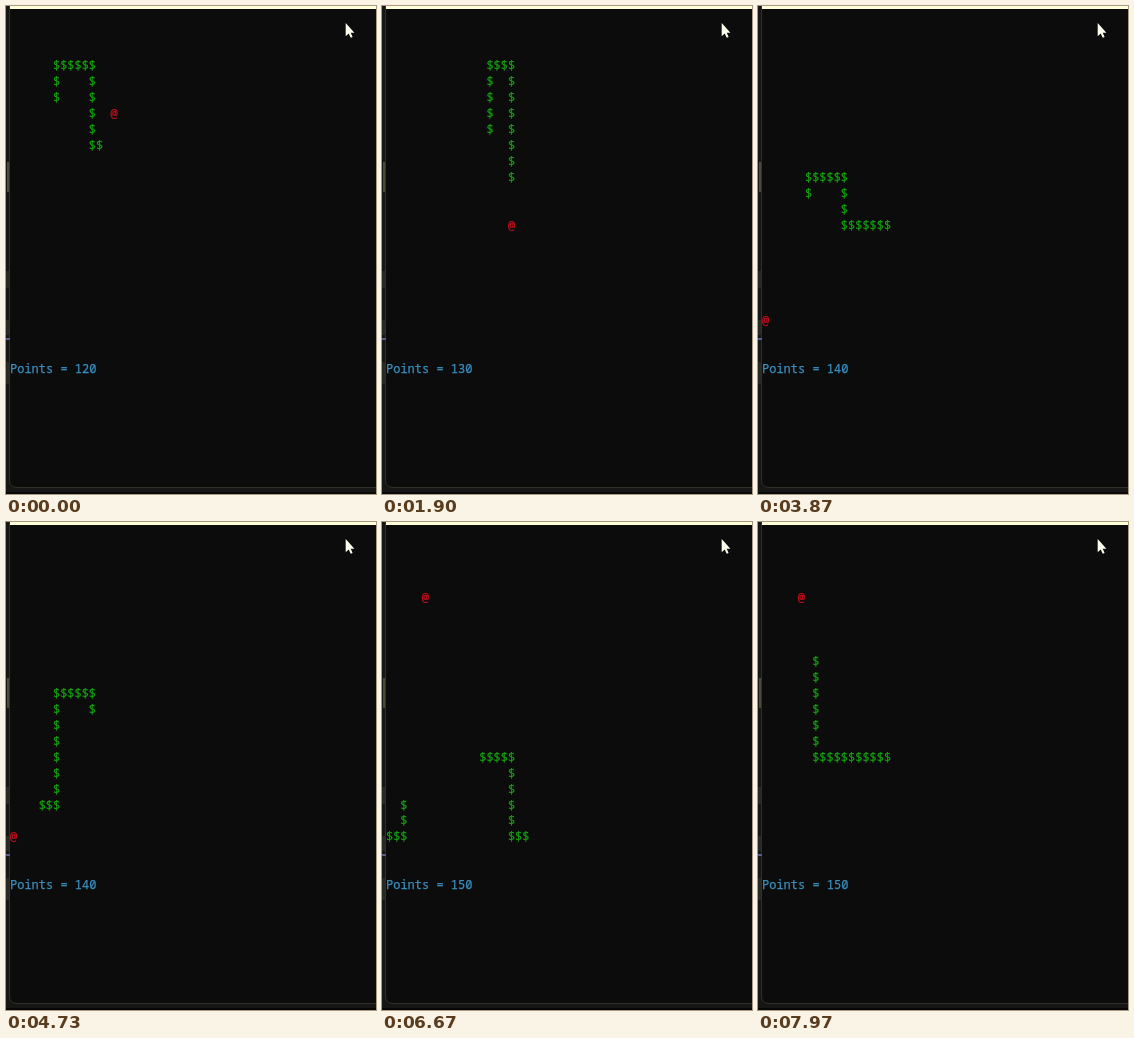
Recreate the animation shown at these times as an HTML page. Size 370x488 px, loop 8000 ms.

```html
<!DOCTYPE html>
<html lang="en">
<head>
<meta charset="utf-8">
<title>Console snake</title>
<style>
  html, body { margin: 0; width: 100%; height: 100%; overflow: hidden; background: #0c0c0c; }
  svg { display: block; width: 370px; height: 488px; }
  text {
    font: 12px "Noto Sans Mono", "DejaVu Sans Mono", monospace;
    white-space: pre; stroke: currentColor; stroke-width: .25px; fill: currentColor;
  }
  #snake { color: #13a10e; }
  #food { color: #c50f1f; }
  #points { color: #3a8fc0; }
</style>
</head>
<body>
<svg viewBox="0 0 370 488">
  <rect width="370" height="488" fill="#161614"/>
  <path d="M3.5 0V474Q3.5 481.5 11 481.5H370V0Z" fill="#0c0c0c"/>
  <path d="M3.5 0V474Q3.5 481.5 11 481.5H370" fill="none" stroke="#303028"/>
  <rect x="4" width="366" height="3" fill="#ffffda"/>
  <rect y="486" width="370" height="2" fill="#080808"/>
  <rect x="1" y="156" width="2" height="30" fill="#4c4c38"/>
  <path d="M0 265H3V282H0ZM0 314H3V329H0ZM0 356H3V378H0Z" fill="#282824"/>
  <rect y="332" width="4" height="2" fill="#5c5c90"/>
  <g id="snake"></g>
  <text id="food">@</text>
  <text id="points"></text>
  <path d="M339.7 17V30.2L342.7 27.5L344.8 31.8L346.6 31L344.7 26.7H348.4Z" fill="#fffff0"/>
</svg>
<script>
const LOOP = 8000, STEP = 108.66, DELAY = 2, FRAME = 100 / 3;
const COLS = 20, START = 13, START_LENGTH = 14;
const DIRS = { U: [0, -1], D: [0, 1], L: [-1, 0], R: [1, 0] };
const ROUTE = "U2 R5 D5 R3 U5 R3 D10 L6 U3 L5 D7 L4 D2 L5 U5 L10 U6";

// Food cells, in the order they are eaten
const FOODS = [[14, 3], [17, 10], [0, 16], [5, 1]];

const cells = [[6, 2]];
for (const leg of ROUTE.split(" ")) {
  const [dx, dy] = DIRS[leg[0]];
  for (let n = +leg.slice(1); n > 0; n--) {
    const [x, y] = cells[cells.length - 1];
    cells.push([(x + dx + COLS) % COLS, y + dy]);
  }
}

// Path index at which each food is reached
const meals = [];
for (const [fx, fy] of FOODS) {
  const from = meals.length ? meals[meals.length - 1] : START;
  const at = cells.findIndex(([x, y], i) => i > from && x === fx && y === fy);
  meals.push(at < 0 ? Infinity : at);
}

const snake = document.getElementById("snake");
const food = document.getElementById("food");
const points = document.getElementById("points");

const body = Array.from({ length: START_LENGTH + FOODS.length }, () => {
  const el = document.createElementNS(snake.namespaceURI, "text");
  el.textContent = "$";
  return snake.appendChild(el);
});

function place(el, [col, row]) {
  el.setAttribute("x", (4 + col * 7.17).toFixed(2));
  el.setAttribute("y", Math.round(64.2 + row * 15.95));
}

function draw(ms) {
  const t = Math.floor((ms + 5) / FRAME) * FRAME;
  const moves = Math.max(0, Math.floor((t - DELAY) / STEP));
  const head = Math.min(START + moves, cells.length - 1);
  const eaten = meals.filter(at => at <= head).length;

  body.forEach((el, i) => {
    const shown = i < START_LENGTH + eaten;
    el.setAttribute("visibility", shown ? "visible" : "hidden");
    if (shown) place(el, cells[head - i]);
  });
  place(food, FOODS[eaten]);
  points.textContent = "Points = " + (120 + eaten * 10);
}

place(points, [0, 19]);
const begin = performance.now();
function tick() {
  draw((performance.now() - begin) % LOOP);
  requestAnimationFrame(tick);
}
tick();
</script>
</body>
</html>
```
